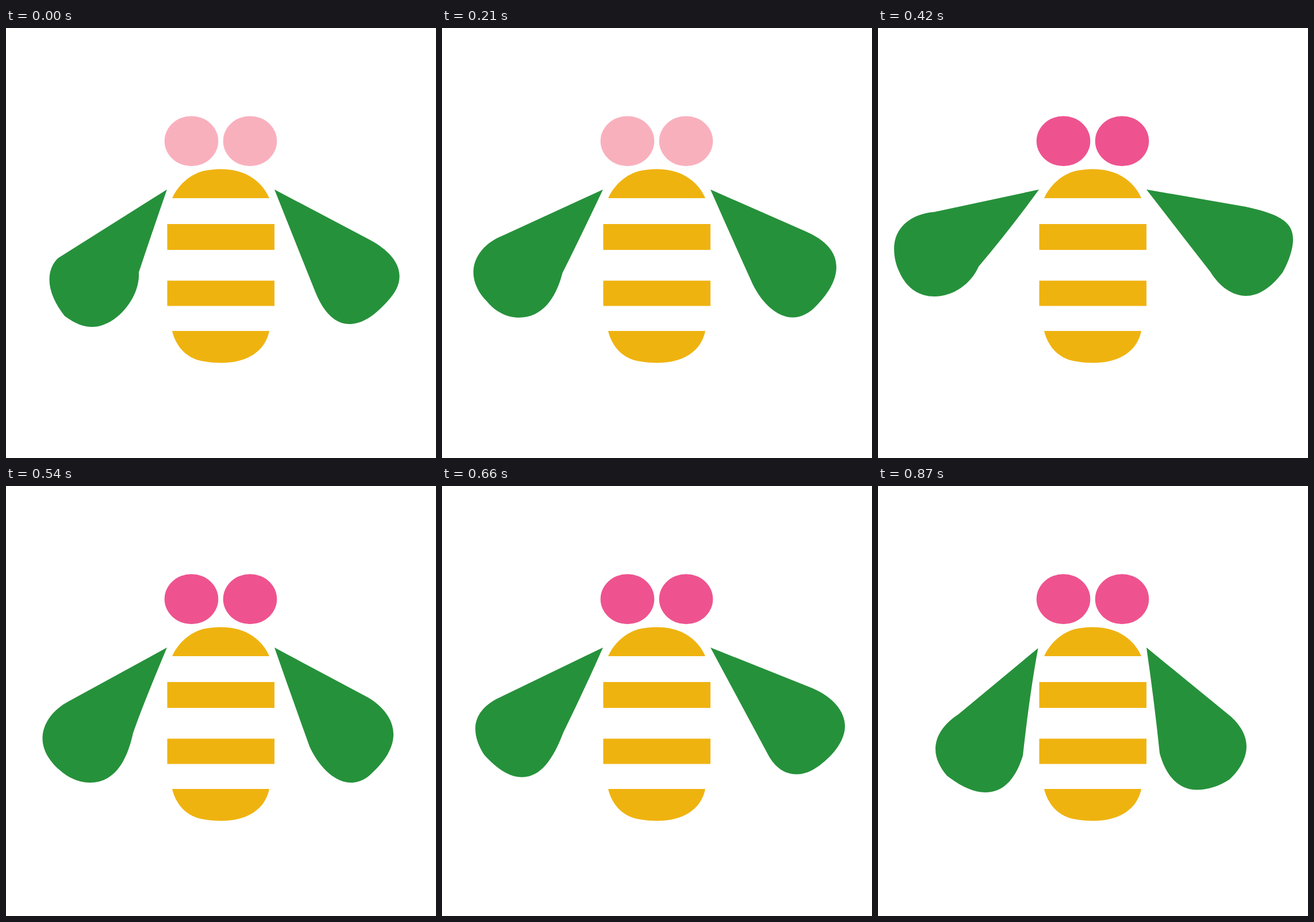
An HTML page for the animation above (0.9 s loop, 748x748 px).

```html
<!DOCTYPE html>
<html lang="en">
<head>
<meta charset="utf-8">
<title>Bee</title>
<style>
  html, body { margin: 0; width: 100%; height: 100%; overflow: hidden; background: #fff; }
  svg { display: block; width: 100%; height: 100%; }
</style>
</head>
<body>
<svg viewBox="0 0 748 748">
  <g id="eyes">
    <ellipse cx="322.5" cy="196.7" rx="46.8" ry="43.5"/>
    <ellipse cx="424.5" cy="196.7" rx="46.8" ry="43.5"/>
  </g>
  <g fill="#efb310">
    <path d="M289 296C299 274 318 256 342 249C352 247 363 245.5 374 245.5C414 245.5 444 264 458 296Z"/>
    <rect x="280.5" y="341" width="186.5" height="45"/>
    <rect x="280.5" y="439.5" width="186.5" height="44"/>
    <path d="M289 527C296 556 316 575 342 579.5C352 581.5 363 582.5 374 582.5C420 582.5 451 562 458 527Z"/>
  </g>
  <g fill="#26913b">
    <path id="left"/>
    <path id="right"/>
  </g>
</svg>
<script>
const LOOP = 900, BEAT = 300, STEP = 30;
const LIGHT = '#f9b0bd', DARK = '#ee538f';

// Wing poses at these times within one beat; the last wraps to the first.
const TIMES = [0, 60, 120, 240, 270, 300];
const WINGS = {
  left: [
    'M280 281L91 400C81 409 75.5 422 75.5 438C75.5 458 86 481 102 501C118 513 134 520 150 520C190 520 234 470 231 425Q255 353 280 281Z',
    'M280 281L100 368C74 380 58 399 58 422C58 438 64 453 73 467C94 491 117 506.5 139 506.5C173 506.5 194 473 211 429Q246 358 280 281Z',
    'M280 281L98 320C60 323 28 345 28 384C28 398 31 412 37 424C50 454 73 467 98 467C131 467 162 445 175 415Q230 350 280 281Z',
    'M280 281L110 374C81 389 63.5 414 63.5 439C63.5 459 75 478 92 493C107 507 127 516 146 516C188 516 210 480 221 430Q236 386 280 281Z',
    'M278.5 282L140 397C114 414 100 435 100 458C100 474 108 490 120 504C142 521 165 533 187 533C219 533 240 508 252 469Q264 360 278.5 282Z'
  ],
  right: [
    'M467 281L632 368C664 385 684.5 407 684.5 432C684.5 447 677 461 664 475C638 504 617 515 597 515C572 515 552 494 538 459Q502 369 467 281Z',
    'M467 281L645 352C679 367 701 391 701 418C701 434 692 452 678 467C656 490 636 501.5 617 501.5C597 501.5 579 490 567 467Q517 374 467 281Z',
    'M467 281L640 311C700 324 722 338 722 368C722 384 715 405 704 425C683 453 661 466 640 466C617 466 594 450 578 424Q522 352 467 281Z',
    'M467 281L630 368C657 384 674 407 674 432C674 455 660 478 636 500C625 511 612 516 600 516C573 516 545 490 528 453Q497 367 467 281Z',
    'M467 281L615 402C632 418 641 435 641 453C641 473 630 493 612 510C594 522 574 528.5 555 528.5C523 528.5 501 505 490 465Q481 378 467 281Z'
  ]
};

const byId = id => document.getElementById(id);

// Blends two paths that share the same commands.
function blend(from, to, k) {
  const ends = to.match(/[\d.]+/g);
  let i = 0;
  return from.replace(/[\d.]+/g, n => +n + (ends[i++] - n) * k);
}

function wingPath(poses, t) {
  const i = TIMES.findLastIndex(start => start <= t);
  const k = (t - TIMES[i]) / (TIMES[i + 1] - TIMES[i]);
  return blend(poses[i], poses[(i + 1) % poses.length], k);
}

function draw(ms) {
  const t = Math.floor(ms % LOOP / STEP) * STEP;
  for (const id in WINGS) byId(id).setAttribute('d', wingPath(WINGS[id], t % BEAT));
  byId('eyes').setAttribute('fill', t < BEAT ? LIGHT : DARK);
}

const begin = performance.now();
function tick() {
  draw(performance.now() - begin);
  requestAnimationFrame(tick);
}
tick();
</script>
</body>
</html>
```
